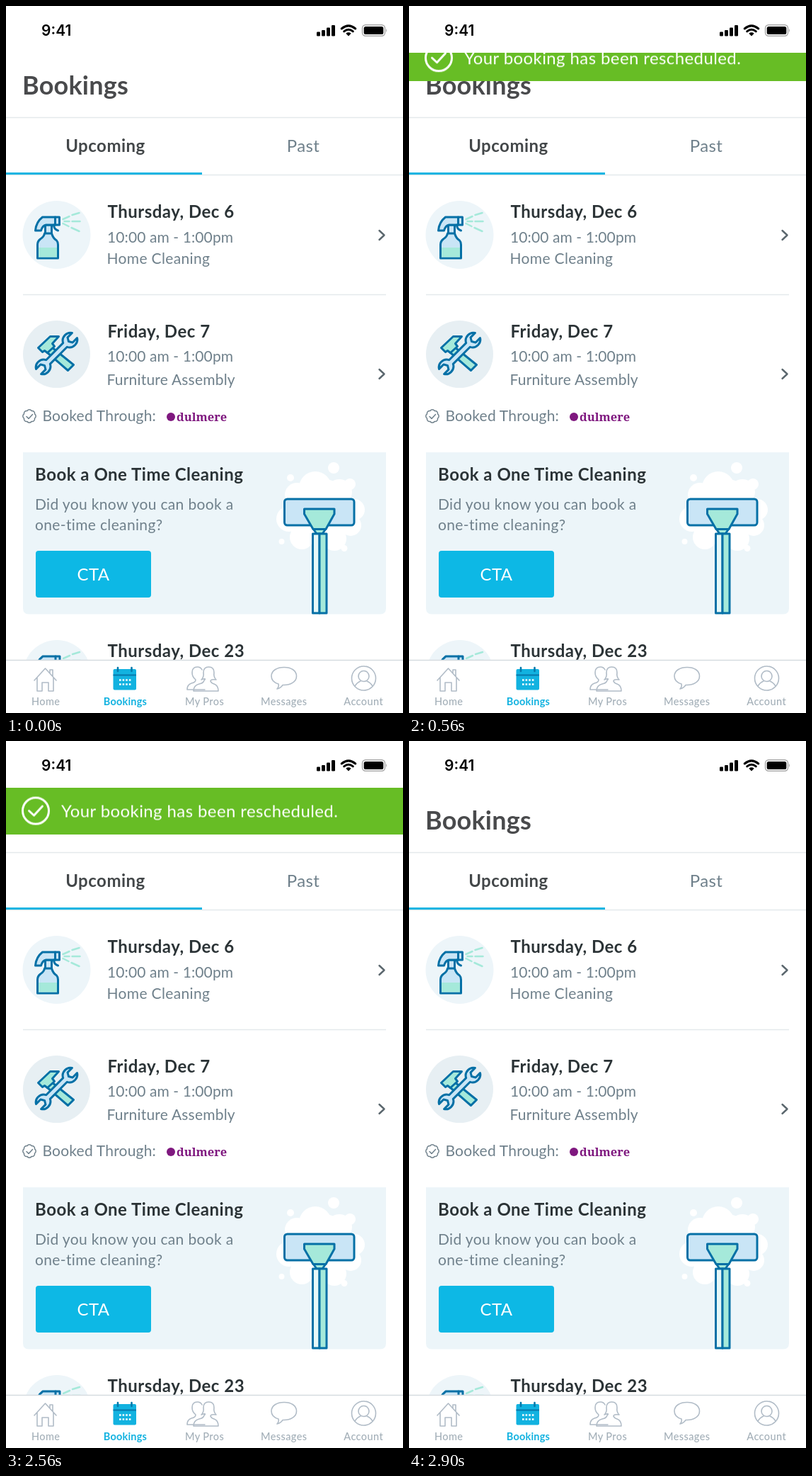
Recreate the animation shown at these times as an HTML page. Size 561 px wide and 998 px high, loop 3.88 s.

```html
<!DOCTYPE html>
<html lang="en">
<head>
<meta charset="utf-8">
<title>Bookings</title>
<style>
  html, body { margin: 0; width: 100%; height: 100%; overflow: hidden; background: #fff; }
  svg { display: block; width: 561px; height: 998px; }
  text { font-family: Lato, "Open Sans", sans-serif; font-size: 21px; letter-spacing: .35px; fill: #6f808b; }
  .head { font-weight: 700; font-size: 24px; letter-spacing: .5px; fill: #2b3336; }
  .title { font-weight: 700; font-size: 36px; letter-spacing: .2px; fill: #494a4c; }
  .time { letter-spacing: .1px; }
  .tab { font-size: 24px; }
  .mid { text-anchor: middle; }
  .white { fill: #fff; }
  .clock { font: 600 21px Inter, sans-serif; letter-spacing: 0; fill: #000; }
  .partner { font: 700 16.5px "Noto Serif", serif; letter-spacing: 0; fill: #7f187f; }
  .nav text { font-size: 14.5px; font-weight: 500; letter-spacing: .4px; text-anchor: middle; fill: #a3afb8; }
  .nav .on { fill: #12b2e0; font-weight: 700; letter-spacing: .2px; }
  .line { fill: none; stroke-linecap: round; stroke-linejoin: round; }
  .rule { stroke: #e4e9ec; stroke-width: 1.5; }
  .ink { stroke: #0570a6; stroke-width: 3; stroke-linejoin: round; }
  .sky { fill: #c9e5f6; }
  .mint { fill: #a5e9da; }

  .banner { animation: slide 3880ms infinite; }
  /* quadratic ease-in-out, 360 ms each way */
  @keyframes slide {
    0%, 9.27835% { transform: translateY(-66px); animation-timing-function: cubic-bezier(.3333, 0, .6667, .3333); }
    13.91753% { transform: translateY(-33px); animation-timing-function: cubic-bezier(.3333, .6667, .6667, 1); }
    18.5567%, 65.46392% { transform: translateY(0); animation-timing-function: cubic-bezier(.3333, 0, .6667, .3333); }
    70.10309% { transform: translateY(-33px); animation-timing-function: cubic-bezier(.3333, .6667, .6667, 1); }
    74.74227%, 100% { transform: translateY(-66px); }
  }
</style>
</head>
<body>
<svg viewBox="0 0 561 998">
  <defs>
    <g id="spray">
      <circle r="48" fill="#edf5f9"/>
      <g class="ink">
        <path class="sky" d="M-16-14H-7V0H-16Z"/>
        <path class="sky" d="M-17-2H-7Q-5 5 0 8Q2 10 2 14V33H-27V14Q-27 9-23 6Q-18 3-17-2Z"/>
        <path class="mint" stroke="none" d="M-25.500 18H.5V31.500H-25.500Z"/>
        <path class="sky" d="M-20-25H4V-14H-15Q-20-13-22-6H-30Q-29-18-20-25Z"/>
        <path class="line" d="M-4-14Q-4-8 2-6M-2-25V-14"/>
      </g>
      <path class="line" stroke="#a5e9da" stroke-width="2.500" stroke-linecap="butt"
        d="M9-22L18-26M22-28L32-31M11-19H18M22-19H33M9-16L17-12M21-10L32-5"/>
    </g>
    <path id="next" class="line" d="M-3.500-6.500L3.500 0L-3.500 6.500" stroke="#5b676e" stroke-width="2.400"/>
  </defs>

  <rect width="561" height="998" fill="#fff"/>

  <text class="title" x="23" y="125">Bookings</text>
  <path class="rule" d="M0 157.500H561M0 238.500H561M24 407.500H537"/>
  <text class="head mid" x="140.500" y="206" style="fill:#434749">Upcoming</text>
  <text class="tab mid" x="420" y="206">Past</text>
  <path fill="#12b5e2" d="M0 235H277V238H0Z"/>

  <use href="#spray" x="71.500" y="323"/>
  <text class="head" x="143.500" y="299">Thursday, Dec 6</text>
  <text class="time" x="143" y="334">10:00 am - 1:00pm</text>
  <text x="142.500" y="363.500">Home Cleaning</text>
  <use href="#next" x="531" y="323.500"/>

  <circle cx="71.500" cy="491.500" r="47.500" fill="#e7eff3"/>
  <g class="ink" transform="translate(71.500 490.500)" stroke-width="2.600">
    <path class="mint" d="M-7-9L-14-2L16 24L24 16Z"/>
    <path class="mint" d="M-26-8L-9-24H3L-6-14L-3-10L-13-1L-17-4L-20-2Z"/>
    <path class="sky" transform="rotate(45)" d="M-4-17Q-10-20-10-27Q-10-33-5-36V-27L0-24L5-27V-36Q10-33 10-27Q10-20 4-17V17Q10 20 10 27Q10 33 5 36V27L0 24L-5 27V36Q-10 33-10 27Q-10 20-4 17Z"/>
  </g>
  <text class="head" x="143.500" y="468">Friday, Dec 7</text>
  <text class="time" x="143" y="502">10:00 am - 1:00pm</text>
  <text x="142.500" y="534.500" style="letter-spacing:.2px">Furniture Assembly</text>
  <use href="#next" x="531" y="519.500"/>

  <g class="line" transform="translate(33 579)" stroke="#6f808b" stroke-width="1.500">
    <path d="M7.500 3.100A3.700 3.700 0 0 1 3.100 7.500A3.700 3.700 0 0 1-3.100 7.500A3.700 3.700 0 0 1-7.500 3.100A3.700 3.700 0 0 1-7.500-3.100A3.700 3.700 0 0 1-3.100-7.500A3.700 3.700 0 0 1 3.100-7.500A3.700 3.700 0 0 1 7.500-3.100A3.700 3.700 0 0 1 7.500 3.100Z"/>
    <path d="M-4 .5L-1 3.500L4.500-2.500"/>
  </g>
  <text x="51.500" y="585.500" style="letter-spacing:.2px">Booked Through:</text>
  <circle cx="233" cy="580" r="6" fill="#7f187f"/>
  <text class="partner" x="241" y="586">dulmere</text>

  <path fill="#ecf5f9" d="M24 630H537V850Q537 858.500 529 858.500H32Q24 858.500 24 850Z"/>
  <text class="head" x="41" y="670">Book a One Time Cleaning</text>
  <text x="41" y="711">Did you know you can book a</text>
  <text x="41" y="739.500">one-time cleaning?</text>
  <rect x="42" y="769" width="163" height="66" rx="4" fill="#0db8e5"/>
  <text class="tab mid white" x="123.500" y="811">CTA</text>

  <g fill="#fff">
    <ellipse cx="444" cy="713" rx="47" ry="46"/>
    <circle cx="437" cy="680" r="23"/>
    <circle cx="411" cy="690" r="17"/>
    <circle cx="400" cy="724" r="18"/>
    <circle cx="418" cy="750" r="17"/>
    <circle cx="464" cy="752" r="17"/>
    <circle cx="487" cy="733" r="15"/>
    <circle cx="492" cy="711" r="15"/>
    <circle cx="471" cy="686" r="18"/>
    <circle cx="486" cy="675" r="8"/>
    <circle cx="463" cy="652" r="8"/>
    <circle cx="402" cy="666" r="5"/>
    <circle cx="389.500" cy="756" r="4"/>
    <circle cx="478" cy="765.500" r="4.500"/>
  </g>
  <g class="ink">
    <rect class="sky" x="393.500" y="696" width="98.500" height="37" rx="4"/>
    <path class="mint" d="M434 738H452L447 745H439Z"/>
    <path class="mint" d="M421.500 710H464V717L452 738.500H434L421.500 717Z"/>
    <path fill="#e6f7f8" d="M433.500 745H443V857H433.500Z"/>
    <path class="mint" d="M443 745H453V857H443Z"/>
  </g>

  <use href="#spray" x="72" y="943"/>
  <text class="head" x="143.500" y="919">Thursday, Dec 23</text>

  <g class="nav">
    <path fill="#fff" d="M0 923H561V998H0Z"/>
    <path d="M0 923.500H561" stroke="#d5dce0" stroke-width="1.500"/>
    <g class="line" stroke="#b1bcc7" stroke-width="1.600">
      <path d="M40 952L55.500 935L71 952M44 948V967H51V955H60V967H67V948M62 942V937H66V946"/>
      <path d="M281 965H256Q256 958 262 956Q268 955 268 951Q263 947 263 941Q263 933 270.500 933Q275 933 277 937"/>
      <path d="M265 967Q265 959 273 957Q279 956 280 952Q284 948 276 951Q280 947 279 941Q279 933 286.500 933Q294 933 294 941Q293 947 297 951Q289 950 289 953Q290 956 294 957Q300 959 300 967Z"/>
      <path d="M383 964Q386 961 385 957C378 955 375 951 375 946C375 938 383 933.500 393 933.500C403 933.500 410.500 938 410.500 946C410.500 954 402 959 391 958.500Q388 963 383 964Z"/>
      <circle cx="505.500" cy="949" r="17"/>
      <circle cx="505.500" cy="946" r="7.500"/>
      <path d="M493 960Q496 955 501 953M510 953Q515 955 518 960"/>
    </g>
    <rect x="151.500" y="936" width="32.500" height="29.500" rx="2" fill="#12b2e0"/>
    <path d="M151.500 944.500H184" stroke="#0679ab" stroke-width="1.800"/>
    <path class="line" d="M158 934V939M177.500 934V939" stroke="#0679ab" stroke-width="2.600"/>
    <path d="M160 951.500H177M160 957.500H177" stroke="#fff" stroke-width="2.600" stroke-dasharray="2.600 2"/>
    <text x="56.200" y="987">Home</text>
    <text class="on" x="168.500" y="987">Bookings</text>
    <text x="280.500" y="987">My Pros</text>
    <text x="392.700" y="987">Messages</text>
    <text x="505.200" y="987">Account</text>
  </g>

  <g class="banner">
    <rect y="66" width="561" height="66" fill="#67bd25"/>
    <g class="line" stroke="#fff" stroke-width="3">
      <circle cx="42" cy="99" r="18.500"/>
      <path d="M32.500 99L39.500 105.500L51.500 92.500"/>
    </g>
    <text class="tab white" x="78" y="108" style="letter-spacing:.4px">Your booking has been rescheduled.</text>
  </g>

  <rect width="561" height="66" fill="#fff"/>
  <text class="clock" x="50" y="42">9:41</text>
  <rect x="439" y="36.500" width="5" height="6" rx="1.200"/>
  <rect x="446" y="34" width="5" height="8.500" rx="1.200"/>
  <rect x="453" y="30.500" width="5" height="12" rx="1.200"/>
  <rect x="460" y="27" width="5" height="15.500" rx="1.200"/>
  <path d="M484 42.500L480.300 38.700Q484 35.800 487.700 38.700Z"/>
  <path class="line" d="M477.700 35.800Q484 30.600 490.300 35.800M474.200 32Q484 23.800 493.800 32" stroke="#000" stroke-width="3" stroke-linecap="butt"/>
  <rect x="503.500" y="26.700" width="32" height="15.600" rx="4.500" fill="none" stroke="#a6a6a6" stroke-width="1.400"/>
  <rect x="505.700" y="28.900" width="27.600" height="11.200" rx="2.600"/>
  <path fill="#a6a6a6" d="M537 32Q539 34.500 537 37Z"/>
</svg>
</body>
</html>
```
